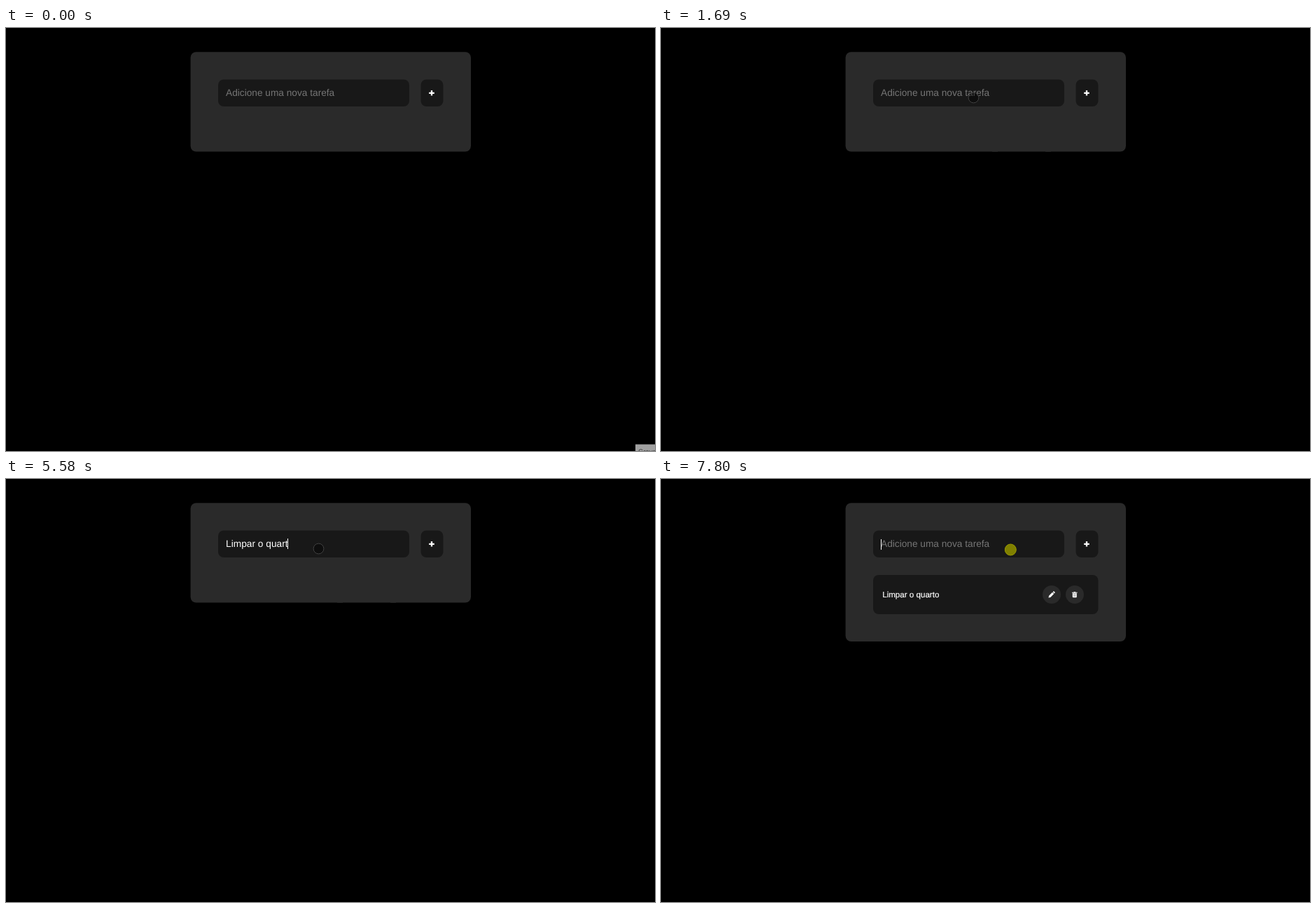
Recreate the animation shown at these times as an HTML page. Size 927 by 604 pixels, loop 8000 ms.

```html
<!DOCTYPE html>
<html lang="pt-BR">
<head>
<meta charset="utf-8">
<title>Lista de tarefas</title>
<style>
  html, body { margin: 0; width: 100%; height: 100%; overflow: hidden; background: #000; }
  svg { display: block; }
  text { font-family: "Liberation Sans", Arial, sans-serif; font-size: 13.75px; fill: #fff; text-rendering: geometricPrecision; }
  .panel { fill: #2a2a2a; }
  .field { fill: #181818; }
  .icon { fill: #fff; }
  #placeholder { fill: #757575; font-size: 13.7px; }
  #item text { font-size: 11.6px; stroke: #fff; stroke-width: .2px; }
  #tip text { font-size: 9.5px; fill: #333; }
</style>
</head>
<body>
<svg width="927" height="604" viewBox="0 0 927 604">
  <rect id="card" class="panel" x="263.6" y="34.2" width="400.4" rx="8"/>
  <path id="smudges" d="M473 176.5h8M549 176.5h8" stroke="#222"/>
  <rect class="field" x="303" y="73.5" width="273" height="38.5" rx="8"/>
  <rect class="field" x="592.5" y="73.5" width="32" height="38.5" rx="8"/>
  <path d="M604.2 92.8h7.6M608 89v7.6" stroke="#fff" stroke-width="2.3"/>
  <rect id="tap" x="592.5" y="73.5" width="32" height="38.5" fill="rgb(51,181,229)"/>
  <text id="placeholder" x="314" y="97">Adicione uma nova tarefa</text>
  <text id="typed" x="314" y="97"></text>
  <rect id="caret" width="1" height="15" fill="#fff"/>
  <g id="item">
    <rect class="field" x="303" y="137" width="321.5" height="56" rx="8"/>
    <text x="316.2" y="168.5">Limpar o quarto</text>
    <circle class="panel" cx="558" cy="165" r="13"/>
    <circle class="panel" cx="591" cy="165" r="13"/>
    <path class="icon" d="M553.5 169.5l.6-2.8 4.9-4.9 2.2 2.2-4.9 4.9zM559.6 161.2l.7-.6q.6-.5 1.2 0l1 1q.5.6 0 1.2l-.7.6z"/>
    <path class="icon" d="M587 162.8v-1h2.2l.5-.9h2.2l.5.9h2.2v1zM587.8 163.3h6v5q0 1-1 1h-4q-1 0-1-1z"/>
    <path d="M589.6 164.3v3.7M590.8 164.3v3.7M592 164.3v3.7" stroke="#777" stroke-width=".5"/>
  </g>
  <g id="tip">
    <rect x="899" y="594.5" width="28" height="10" fill="#a0a0a0"/>
    <text x="903" y="607.5">Gravar</text>
  </g>
  <circle id="pointer"/>
</svg>
<script>
const LOOP = 8000, BLINK = 500, CLICK = 70;
const FOCUS = 1830, TYPE_START = 3590, TYPE_END = 5650, ADD = 6740, REFOCUS = 7800;
const phrase = "Limpar o quarto";
const keyGap = (TYPE_END - TYPE_START) / (phrase.length - 1);
const clicks = [1760, 3190, 6670, 7740];

// Pointer waypoints: time, x, y
const path = [
  [70, 890, 560], [350, 566, 158], [950, 566, 158], [1020, 553, 175], [1090, 477, 175],
  [1220, 443.5, 150], [1690, 446.5, 99.5], [6200, 446.5, 99.5], [6530, 616.8, 105],
  [7130, 616.8, 105], [7540, 499.3, 101]
];

const el = id => document.getElementById(id);
const show = (id, on) => el(id).style.display = on ? "" : "none";
const set = (id, attrs) => Object.entries(attrs).forEach(([k, v]) => el(id).setAttribute(k, v));
const clamp = v => Math.max(0, Math.min(1, v));
const smooth = v => v * v * (3 - 2 * v);

function pointerAt(t) {
  const i = Math.max(0, path.findLastIndex(p => t >= p[0]));
  const from = path[i], to = path[i + 1] || from;
  const k = smooth(clamp((t - from[0]) / (to[0] - from[0] || 1)));
  return [1, 2].map(axis => from[axis] + (to[axis] - from[axis]) * k);
}

function caretVisible(t) {
  if (t < FOCUS || (t >= ADD && t < REFOCUS)) return false;
  const typing = t >= TYPE_START && t < TYPE_END;
  const since = t >= REFOCUS ? REFOCUS : t >= TYPE_END ? TYPE_END : FOCUS;
  return typing || Math.floor((t - since) / BLINK) % 2 === 0;
}

function draw(t) {
  const added = t >= ADD;
  const count = added || t < TYPE_START ? 0 : Math.floor((t - TYPE_START) / keyGap + 1.001);
  const typed = el("typed");
  typed.textContent = phrase.slice(0, count).replace(/ $/, "\u00a0");
  show("placeholder", !count);
  show("caret", caretVisible(t));
  set("caret", {
    x: Math.round(314 + (count ? typed.getComputedTextLength() - 0.3 : 0)),
    y: count ? 85 : 86
  });

  show("tip", t < path[0][0]);
  show("item", added);
  show("smudges", t >= 1090 && !added);
  set("card", { height: added ? 197.8 : 142.3 });
  set("tap", { opacity: added ? 0.4 * clamp((7000 - t) / 140) : 0 });

  const [cx, cy] = pointerAt(t);
  const pressed = clicks.some(c => t >= c && t < c + CLICK);
  show("pointer", t >= path[0][0]);
  set("pointer", {
    cx, cy,
    r: pressed ? 8 : 7.4,
    fill: pressed ? "#808000" : "rgba(0,0,0,.4)",
    stroke: pressed ? "#999900" : "#424242"
  });
}

function frame() {
  draw(performance.now() % LOOP);
  requestAnimationFrame(frame);
}
frame();
</script>
</body>
</html>
```
